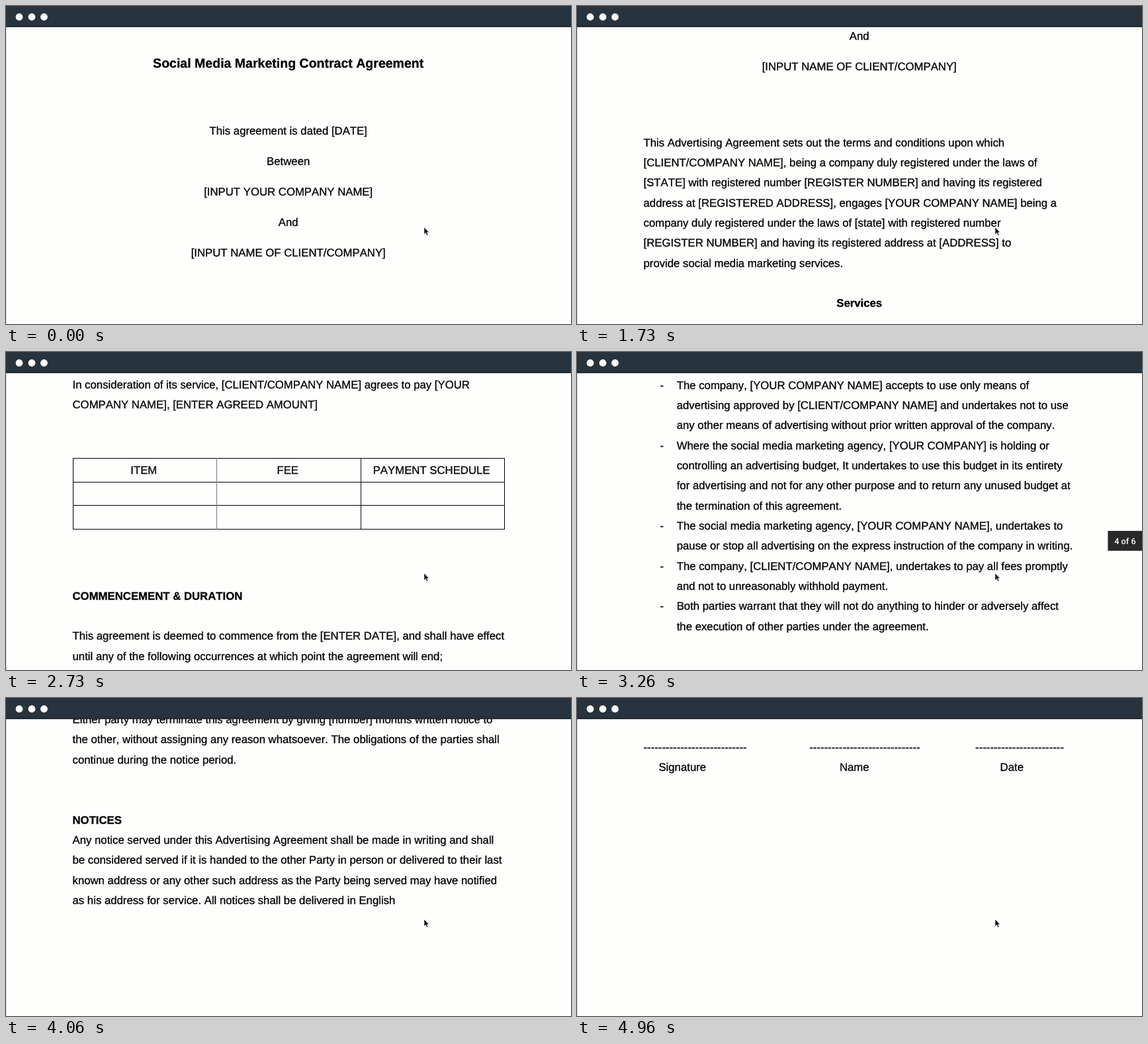
An HTML page for the animation above (5000 ms loop, 854 by 480 pixels).

```html
<!DOCTYPE html>
<html lang="en">
<head>
<meta charset="utf-8">
<title>Contract agreement scroll</title>
<style>
html, body { margin: 0; width: 100%; height: 100%; overflow: hidden; background: #fefefd; }
svg { display: block; width: 100vw; height: 100vh; }
text { font: 16.75px "Liberation Sans", Arial, sans-serif; font-kerning: none; text-rendering: geometricPrecision; fill: #000; }
#doc text { stroke: #000; stroke-width: .3px; }
.bold { font-weight: bold; }
#doc .title { font-size: 19.54px; font-weight: bold; }
.mid { text-anchor: middle; }
#badge text { font: 500 12.7px Roboto, sans-serif; fill: #fff; }
</style>
</head>
<body>
<svg viewBox="0 0 854 480">
  <rect width="854" height="480" fill="#fefefd"/>
  <g id="doc"></g>
  <rect y="32" width="1" height="448" fill="#dcdcdc"/>
  <g id="badge">
    <rect x="802.4" width="52" height="30" fill="#29292b"/>
    <text class="mid" x="828.4" y="19.5"></text>
  </g>
  <path d="M632 334v10.6l2.4-2.2 1.8 3.9 1.7-.8-1.7-3.7h3.2z" fill="#111" stroke="#fff" stroke-width=".5"/>
  <rect width="854" height="32" fill="#27343d"/>
  <rect y="29" width="854" height="3" fill="#232e37"/>
  <g fill="#fff">
    <circle cx="20" cy="16.5" r="5.4"/><circle cx="39" cy="16.5" r="5.4"/><circle cx="57.5" cy="16.5" r="5.4"/>
  </g>
</svg>
<script>
const NS = 'http://www.w3.org/2000/svg';
const doc = document.getElementById('doc');
const badge = document.getElementById('badge');
const label = badge.querySelector('text');

const LEFT = 100.5, MIDDLE = 426.7, LEAD = 30.33;
const PAGE = 1113, GAP = 10, PAGE_TOP = -28, PAGES = 6;

function add(tag, attrs, str) {
  const el = document.createElementNS(NS, tag);
  for (const k in attrs) el.setAttribute(k, attrs[k]);
  if (str) el.textContent = str.replace(/  /g, '\u00a0 ');
  doc.appendChild(el);
}
const put = (x, y, str, cls = '') => add('text', { x, y: y - .2, class: cls }, str);
const box = (x, y, width, height, fill) => add('rect', { x, y, width, height, fill });

// Line marks: "#" bold, "=" bold centred, "-" bullet, ">" indented.
function block(y, str) {
  str.split('\n').forEach((line, i) => {
    const at = y + i * LEAD, rest = line.slice(1);
    if (!line) return;
    if (line[0] === '#') put(LEFT, at, rest, 'bold');
    else if (line[0] === '=') put(MIDDLE, at, rest, 'bold mid');
    else if (line[0] === '-') { put(125.5, at, '-'); put(150.7, at, rest); }
    else if (line[0] === '>') put(150.7, at, rest);
    else put(LEFT, at, line);
  });
}

for (let p = 1; p < PAGES; p++) {
  const y = PAGE_TOP + p * PAGE - GAP;
  box(0, y, 854, GAP, '#eeeff0');
  box(0, y, 854, 1, '#d6d6d6');
  box(0, y + GAP - 1, 854, 1, '#d6d6d6');
}

// Page 1
put(MIDDLE, 93, 'Social Media Marketing Contract Agreement', 'title mid');
['This agreement is dated [DATE]', 'Between', '[INPUT YOUR COMPANY NAME]', 'And', '[INPUT NAME OF CLIENT/COMPANY]']
  .forEach((s, i) => put(MIDDLE, 194 + i * 46, s, 'mid'));
block(493, `This Advertising Agreement sets out the terms and conditions upon which
[CLIENT/COMPANY NAME], being a company duly registered under the laws of
[STATE] with registered number [REGISTER NUMBER] and having its registered
address at [REGISTERED ADDRESS], engages [YOUR COMPANY NAME] being a
company duly registered under the laws of [state] with registered number
[REGISTER NUMBER] and having its registered address at [ADDRESS] to
provide social media marketing services.

=Services

[YOUR COMPANY NAME] agrees to provide the following services;

1.1  Creation and management of social media accounts and pages
1.2  Planning and design of advertising campaigns
1.3  Regular reports on the performance of advertising`);

// Page 2
block(1206, `1.4  Monitoring of comments and messages from customers
1.5  Advice on content and on the audience to be reached`);
block(1351.7, `=Provision of Information

In order to enable [YOUR COMPANY NAME] efficiently manage and carry out its
service, [CLIENT/COMPANY NAME] agrees to provide;

2.1  An executive summary of the company and what it does
2.2  A detailed description of the product or services being advertised including
information relevant to advertising such as cost, payment means, refund policy
2.3  A detailed explanation of metrics used in measuring advertising success relative to
company.
2.4  An indication of intended purpose of advertising
2.5  A detailed budget of advertising
2.6  Access to their website admin area and social media accounts and pages.



=Confidentiality

Both parties agree to keep confidential all information received from the other
in the course of this agreement, and not to disclose it to any third party
without prior written approval.`);

// Page 3
block(2319, `The obligations in this section shall continue after the termination of this
agreement.


#FEES & PAYMENT`);
block(2589, `In consideration of its service, [CLIENT/COMPANY NAME] agrees to pay [YOUR
COMPANY NAME], [ENTER AGREED AMOUNT]`);
const table = 2534 + 160;
[0, 36, 71, 107].forEach(y => box(101, table + y, 653, 1, '#000'));
[[101, '#000'], [318, '#777'], [536, '#111'], [753, '#000']].forEach(([x, c]) => box(x, table, 1, 108, c));
['ITEM', 'FEE', 'PAYMENT SCHEDULE'].forEach((s, i) => put(208.3 + i * 217.4, table + 24, s, 'mid'));
block(2908, `#COMMENCEMENT & DURATION

This agreement is deemed to commence from the [ENTER DATE], and shall have effect
until any of the following occurrences at which point the agreement will end;

-The services set out in this agreement are completed
-The agreement is terminated by either party
-The agreed period of advertising comes to an end`);

// Page 4
block(3432, `#WARRANTIES

The parties undertake as follows;`);
block(3619, `-The company, [YOUR COMPANY NAME] accepts to use only means of
>advertising approved by [CLIENT/COMPANY NAME] and undertakes not to use
>any other means of advertising without prior written approval of the company.
-Where the social media marketing agency, [YOUR COMPANY] is holding or
>controlling an advertising budget, It undertakes to use this budget in its entirety
>for advertising and not for any other purpose and to return any unused budget at
>the termination of this agreement.
-The social media marketing agency, [YOUR COMPANY NAME], undertakes to
>pause or stop all advertising on the express instruction of the company in writing.
-The company, [CLIENT/COMPANY NAME], undertakes to pay all fees promptly
>and not to unreasonably withhold payment.
-Both parties warrant that they will not do anything to hinder or adversely affect
>the execution of other parties under the agreement.



#LIABILITY

Neither party shall be liable to the other for any loss which could not have been
foreseen at the date of this agreement. Nothing in this agreement shall limit the
liability of either party under the law.`);

// Page 5
block(4608, '#TERMINATION');
block(4729.3, `Either party may terminate this agreement by giving [number] months written notice to
the other, without assigning any reason whatsoever. The obligations of the parties shall
continue during the notice period.


#NOTICES
Any notice served under this Advertising Agreement shall be made in writing and shall
be considered served if it is handed to the other Party in person or delivered to their last
known address or any other such address as the Party being served may have notified
as his address for service. All notices shall be delivered in English`);
block(5245, `#GOVERNING LAW
This agreement shall be governed by the laws of [STATE] and the parties agree to
submit to the courts of [STATE].`);

// Page 6
block(5658, 'The parties have signed this agreement on the date first written above.');
const END = 5950;
[[LEFT, 28, 123.4, 'Signature'], [351.2, 30, 396.9, 'Name'], [602.1, 24, 639.6, 'Date']].forEach(([x, n, lx, s]) => {
  put(x, END + 80, '-'.repeat(n));
  put(lx, END + 110, s);
});

// Scroll offset by tick, 30 ticks per second
const STEPS = [[49, 0], [63, 1313], [82, 2534], [98, 3563], [122, 4691], [145, END - 187], [149, END]];
const BADGE_SPANS = [[53, 70], [92, 106], [128, 138]];
const LOOP = 5000, TICK = 100 / 3;

function scrollAt(n) {
  if (n <= 49) return n >= 31 && n < 41 ? 141 : 0;
  const i = STEPS.findIndex(s => n <= s[0]);
  const [n0, s0] = STEPS[i - 1], [n1, s1] = STEPS[i];
  return Math.round(s0 + (s1 - s0) * (n - n0) / (n1 - n0));
}

const start = performance.now();
function draw() {
  const t = (performance.now() - start) % LOOP;
  const n = Math.min(149, Math.floor((t + 7) / TICK));
  const s = scrollAt(n);
  doc.setAttribute('transform', `translate(0 ${-s})`);
  const shown = BADGE_SPANS.some(([a, b]) => n >= a && n <= b);
  badge.setAttribute('visibility', shown ? 'visible' : 'hidden');
  badge.setAttribute('transform', `translate(0 ${Math.floor(120 + (s - 1313) * .067)})`);
  label.textContent = `${Math.floor((s + 240 - PAGE_TOP) / PAGE) + 1} of ${PAGES}`;
  requestAnimationFrame(draw);
}
draw();
</script>
</body>
</html>
```
